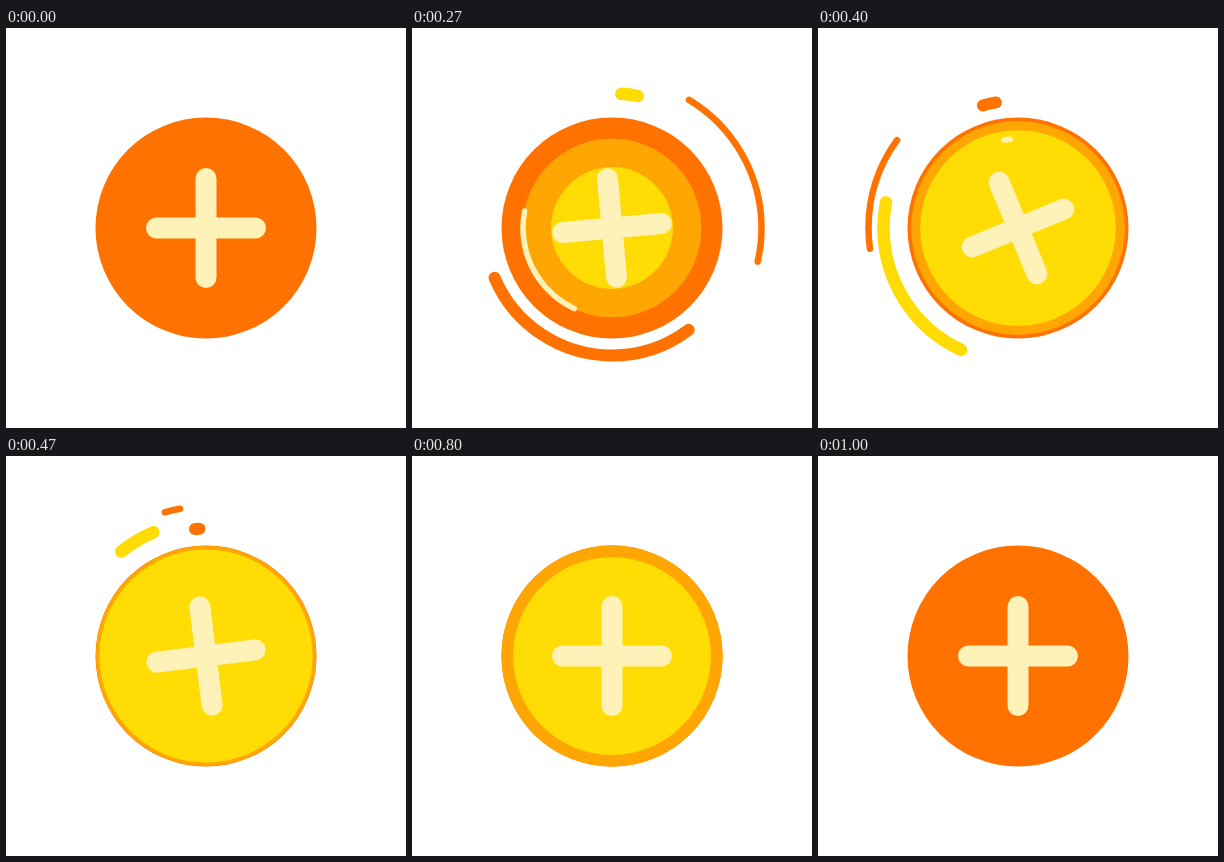
These frames come from a looping animation (400x400 px, 1260 ms). An HTML page:

```html
<!DOCTYPE html>
<html lang="en">
<head>
<meta charset="utf-8">
<title>Plus button</title>
<style>
  html, body { margin: 0; width: 100%; height: 100%; overflow: hidden; background: #fff; }
  svg { display: block; width: 100vw; height: 100vh; }
  .arc { fill: none; stroke-linecap: round; transform: rotate(-90deg); }
  #plus { stroke: #fff2b8; stroke-width: 21; stroke-linecap: round; }
</style>
</head>
<body>
<svg viewBox="-200 -200 400 400">
  <circle r="110.5" fill="#ff7200"/>
  <circle id="amber" fill="#ffa602"/>
  <circle id="yellow" fill="#ffdc04"/>
  <g id="arcs"></g>
  <path id="plus" d="M-49.5 0H49.5M0 -49.5V49.5"/>
</svg>
<script>
const LOOP = 1260, STEP = 100 / 3;
const $ = id => document.getElementById(id);
const clamp = x => Math.min(1, Math.max(0, x));
const easeOut = (t, start, span, power) => 1 - (1 - clamp((t - start) / span)) ** power;
const easeIn = (t, start, span, power) => clamp((t - start) / span) ** power;

// Sweep angles of the leading and trailing end, one point per step.
const HEAD = [0, 11, 103, 176, 247, 281, 306, 337, 350, 355, 357, 360];
const TAIL = [0, 4, 31, 64, 143, 205, 262, 321, 344, 351, 355, 360];

function sample(curve, pos) {
  const p = Math.min(curve.length - 1, Math.max(0, pos));
  const i = Math.floor(p);
  const next = curve[Math.min(i + 1, curve.length - 1)];
  return curve[i] + (next - curve[i]) * (p - i);
}

const arcs = [
  { r: 89, width: 5.5, color: "#fff2b8", delay: 3 },
  { r: 127.5, width: 12, color: "#ff7200", delay: 4 },
  { r: 149.5, width: 6.5, color: "#ff7200", delay: 6 },
  { r: 134.5, width: 12.5, color: "#ffdc04", delay: 7 }
];

for (const arc of arcs) {
  const el = document.createElementNS("http://www.w3.org/2000/svg", "circle");
  const attrs = { class: "arc", r: arc.r, stroke: arc.color, "stroke-width": arc.width, pathLength: 360 };
  for (const name in attrs) el.setAttribute(name, attrs[name]);
  arc.el = $("arcs").appendChild(el);
}

function disc(id, radius, grow, shrink) {
  $(id).setAttribute("r", Math.max(0, radius * (grow - shrink)));
}

function draw(ms) {
  // The motion runs at 30 steps per second.
  const step = Math.floor((ms % LOOP + 3.4) / STEP);
  const t = step * STEP;
  const moving = step > 2;

  disc("amber", 111.5, moving ? easeOut(t, 33, 561, 3) : 0, easeIn(t, 767, 233, 2.5));
  disc("yellow", 112.5, easeOut(t, 151, 505, 3), easeIn(t, 700, 233, 2.5));

  const angle = 360 * easeOut(t, 200 / 3, 1600 / 3, 2.83);
  $("plus").setAttribute("transform", `rotate(${angle})`);

  for (const { el, delay } of arcs) {
    const head = sample(HEAD, step - delay);
    const tail = sample(TAIL, step - delay);
    el.style.visibility = head > tail ? "visible" : "hidden";
    el.style.strokeDasharray = `${head - tail} 720`;
    el.style.strokeDashoffset = -tail;
  }
}

const origin = performance.now();
function tick() {
  draw(performance.now() - origin);
  requestAnimationFrame(tick);
}
tick();
</script>
</body>
</html>
```
